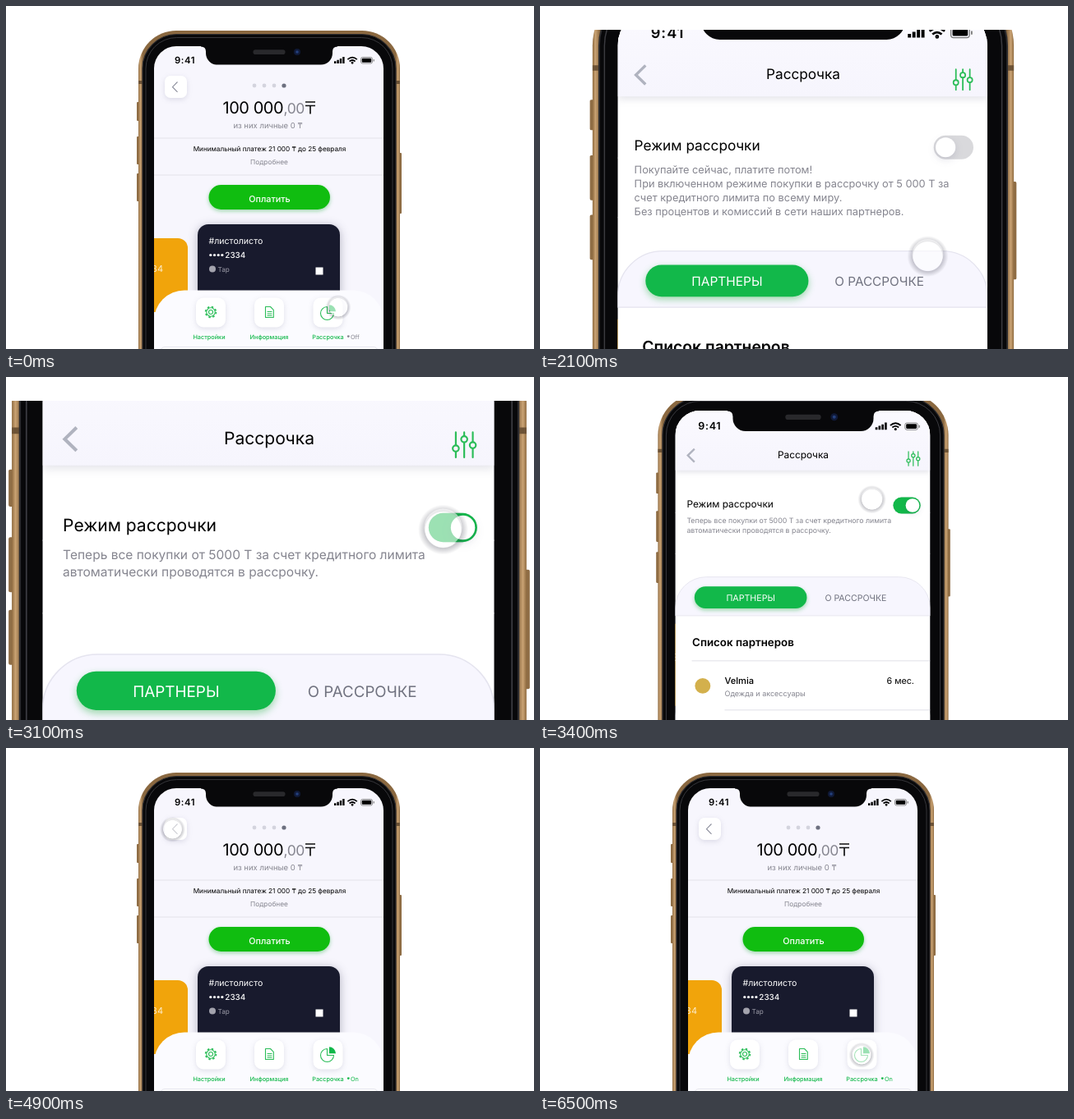
Recreate the animation shown at these times as an HTML page. Size 642 px wide and 418 px high, loop 7.2 s.

```html
<!DOCTYPE html>
<html lang="ru">
<head>
<meta charset="utf-8">
<title>Рассрочка</title>
<style>
  html, body { margin: 0; width: 100%; height: 100%; overflow: hidden; background: #fff; }
  svg { display: block; width: 642px; height: 418px; font: 10px Inter, Roboto, sans-serif; }
  text { text-rendering: geometricPrecision; white-space: pre; }
  .mid { text-anchor: middle; }
  .end { text-anchor: end; }
  .med { font-weight: 500; }
  .semi { font-weight: 600; }
  .white { fill: #fff; }
  .grey { fill: #85858f; }
  .green { fill: #12b84a; }
  .lines { fill: none; stroke: #2bbd58; stroke-width: 1.1; stroke-linejoin: round; stroke-linecap: round; }
  .rule { stroke: #e0e0e7; stroke-width: .9; }
  .lift { filter: drop-shadow(0 2px 3px rgba(60, 60, 100, .14)); }
  .glow { filter: drop-shadow(0 2px 2.5px rgba(20, 170, 50, .4)); }
  .deep { filter: drop-shadow(0 2px 6px rgba(20, 20, 50, .3)); }
</style>
</head>
<body>
<svg viewBox="0 0 642 418">
  <defs>
    <clipPath id="view"><rect x="3" y="29" width="635" height="389"/></clipPath>
    <clipPath id="glass"><rect x="180" y="49" width="279" height="460" rx="27"/></clipPath>
    <linearGradient id="gold" x1="161" x2="479" y1="0" y2="0" gradientUnits="userSpaceOnUse">
      <stop offset="0" stop-color="#8f6b40"/>
      <stop offset=".007" stop-color="#c9a273"/>
      <stop offset=".017" stop-color="#8a6840"/>
      <stop offset=".983" stop-color="#8a6840"/>
      <stop offset=".993" stop-color="#c9a273"/>
      <stop offset="1" stop-color="#8f6b40"/>
    </linearGradient>
    <linearGradient id="head" x2="0" y2="1">
      <stop offset="0" stop-color="#fbfaff"/>
      <stop offset="1" stop-color="#f6f5fd"/>
    </linearGradient>
    <radialGradient id="halo">
      <stop offset=".7" stop-color="#334" stop-opacity="0"/>
      <stop offset=".74" stop-color="#334" stop-opacity=".26"/>
      <stop offset="1" stop-color="#334" stop-opacity="0"/>
    </radialGradient>
  </defs>

  <g clip-path="url(#view)">
    <g id="camera">
      <!-- phone body -->
      <g fill="#8f6d45">
        <rect x="159" y="117" width="4" height="23" rx="1"/>
        <rect x="159" y="159" width="4" height="34" rx="1"/>
        <rect x="159" y="204" width="4" height="34" rx="1"/>
        <rect x="477" y="179" width="4" height="74" rx="1"/>
      </g>
      <rect x="161" y="30" width="318" height="520" rx="46" fill="url(#gold)"/>
      <path d="M161 93h5M474 93h5" stroke="#6d5336" stroke-width="4"/>
      <rect x="166" y="34.5" width="308" height="520" rx="41.5" fill="#08080a" stroke="#2d2c2f" stroke-width="1.2"/>
      <rect x="170" y="38.5" width="300" height="520" rx="37.5" fill="none" stroke="#3b3b40" stroke-width=".9"/>

      <g clip-path="url(#glass)">
        <!-- card screen -->
        <rect x="180" y="49" width="279" height="400" fill="#f7f6fd"/>
        <rect x="193" y="85" width="27" height="27" rx="7" class="white lift"/>
        <path d="M208.5 92.5l-6 6.2 6 6.2" fill="none" stroke="#8b8d9b" stroke-width="1.1"/>
        <g fill="#d4d4de">
          <circle cx="302" cy="97" r="2.4"/>
          <circle cx="314" cy="97" r="2.4"/>
          <circle cx="326" cy="97" r="2.4"/>
          <circle cx="338" cy="97" r="2.6" fill="#6d707f"/>
        </g>
        <text x="263.5" y="131" font-size="20" letter-spacing="-.45">100 000</text>
        <text x="337.5" y="131" font-size="17.5" letter-spacing="-.4" class="grey">,00</text>
        <path d="M364 117h12M364 121.5h12M370 121.5v10" fill="none" stroke="#111" stroke-width="1.7"/>
        <text x="318.5" y="149" font-size="9.5" class="mid grey">из них личные 0 ₸</text>
        <path d="M180 161h279M180 206h279" class="rule"/>
        <text x="320.5" y="177" font-size="8.2" class="mid">Минимальный платеж 21 000 ₸ до 25 февраля</text>
        <text x="320" y="193" font-size="8.3" class="mid grey">Подробнее</text>
        <rect x="246.5" y="218" width="147.5" height="30" rx="15" fill="#10bd10" class="glow"/>
        <text x="320.5" y="239" font-size="10.8" class="mid white med">Оплатить</text>

        <rect x="120" y="283" width="101" height="90" rx="12" fill="#f1a40b"/>
        <text x="191" y="324" font-size="11" class="end white" opacity=".8">2334</text>
        <rect x="233" y="266" width="173" height="110" rx="13" fill="#181a2d" class="deep"/>
        <text x="246.5" y="290" font-size="10.6" class="white">#листолисто</text>
        <g class="white">
          <circle cx="248.8" cy="303.5" r="1.6"/>
          <circle cx="253.5" cy="303.5" r="1.6"/>
          <circle cx="258.2" cy="303.5" r="1.6"/>
          <circle cx="262.9" cy="303.5" r="1.6"/>
        </g>
        <text x="266.3" y="307" font-size="9.9" class="white med">2334</text>
        <circle cx="251" cy="320.5" r="4" fill="#a3a3ad"/>
        <text x="257.5" y="324" font-size="8.2" fill="#9a9aa6">Tap</text>
        <rect x="376.5" y="318.5" width="9" height="9" class="white"/>

        <rect x="180" y="346.5" width="279" height="120" rx="37" fill="#fbfbff"/>
        <g class="white lift">
          <rect x="231" y="355.5" width="36" height="36" rx="9"/>
          <rect x="302" y="355.5" width="36" height="36" rx="9"/>
          <rect x="373.5" y="355.5" width="36" height="36" rx="9"/>
        </g>
        <g class="lines">
          <circle cx="249" cy="373" r="2.5"/>
          <circle cx="249" cy="373" r="5.2"/>
          <circle cx="249" cy="373" r="6.4" stroke-width="1.7" stroke-dasharray="2.4 2.63" stroke-linecap="butt"/>
          <path d="M315.5 366.5h6l3.8 3.8v9.2h-9.8zM318 372.5h5M318 375h5M318 377.3h5"/>
          <path d="M390.5 366.5a8 8 0 1 0 8 8h-8z"/>
          <path d="M393 364.3a8 8 0 0 1 8 8h-8z" class="green" stroke="none"/>
        </g>
        <g font-size="7.3" class="green med">
          <text x="247" y="405.5" class="mid">Настройки</text>
          <text x="320" y="405.5" class="mid">Информация</text>
          <text x="391.5" y="405.5" class="mid">Рассрочка</text>
          <g id="state">
            <circle cx="416.3" cy="402.6" r="1.4"/>
            <text id="word" x="419" y="405.5" font-weight="400">Off</text>
          </g>
        </g>
        <rect x="188" y="415.5" width="264" height="40" rx="5" fill="#fff" stroke="#e6e6ee"/>

        <!-- instalment screen: surfaces, then content -->
        <g id="panel">
          <rect x="180" y="49" width="279" height="400" fill="#fff"/>
          <rect x="180" y="40" width="279" height="74.5" fill="url(#head)" class="lift"/>
          <path d="M180 274v-8.5a34 34 0 0 1 34-34h211a34 34 0 0 1 34 34v8.5z" fill="#f7f6fe" stroke="#e5e4ef" stroke-width=".8"/>
        </g>
        <g id="content">
          <path d="M201 91l-7.3 7.2 7.3 7.2" fill="none" stroke="#b0b3bf" stroke-width="2.1"/>
          <text x="320" y="101.3" font-size="10.7" class="mid">Рассрочка</text>
          <g class="lines">
            <path d="M435.3 94v8M435.3 106v3.5M440.5 94v2.3M440.5 100.3v9.2M445.8 94v6M445.8 104v5.5"/>
            <circle cx="435.3" cy="104" r="1.9"/>
            <circle cx="440.5" cy="98.3" r="1.9"/>
            <circle cx="445.8" cy="102" r="1.9"/>
          </g>
          <text x="192.5" y="155.5" font-size="10.7">Режим рассрочки</text>
          <rect x="418.5" y="144" width="30" height="18" rx="9" fill="#d9d9dc"/>
          <rect id="track" x="418.5" y="144" width="30" height="18" rx="9" class="green"/>
          <circle id="knob" cx="427.5" cy="153" r="7.5" class="white lift"/>
          <g id="before" font-size="7.95" class="grey">
            <text x="192.5" y="173">Покупайте сейчас, платите потом!</text>
            <text x="192.5" y="183.4">При включенном режиме покупки в рассрочку от 5 000 Т за</text>
            <text x="192.5" y="193.8">счет кредитного лимита по всему миру.</text>
            <text x="192.5" y="204.2">Без процентов и комиссий в сети наших партнеров.</text>
          </g>
          <g id="after" font-size="7.9" class="grey">
            <text x="192.5" y="172.8">Теперь все покупки от 5000 Т за счет кредитного лимита</text>
            <text x="192.5" y="183">автоматически проводятся в рассрочку.</text>
          </g>
          <rect x="201" y="242" width="123" height="24" rx="12" class="green glow"/>
          <text x="262.5" y="257.8" font-size="9.6" class="mid white">ПАРТНЕРЫ</text>
          <text x="377.5" y="258" font-size="9.5" class="mid" fill="#70727f">О РАССРОЧКЕ</text>
          <text x="198.5" y="307.8" font-size="12" class="semi">Список партнеров</text>
          <path d="M198 323.5h261M234 377.5h225" class="rule"/>
          <circle cx="210" cy="351" r="8.5" fill="#d3b04c"/>
          <text x="234" y="349" font-size="10" class="med">Velmia</text>
          <text x="234" y="362" font-size="8.15" class="grey">Одежда и аксессуары</text>
          <text x="441.5" y="349" font-size="9.7" class="end">6 мес.</text>
          <circle cx="208" cy="405" r="8.5" fill="#4c3b39"/>
          <text x="234" y="404" font-size="10" class="med">Tofu Yard</text>
          <text x="234" y="417" font-size="8.15" class="grey">Рестораны</text>
          <text x="441.5" y="404" font-size="9.7" class="end">12 мес.</text>
        </g>
      </g>

      <!-- notch and status bar -->
      <path d="M237 48h166v1.5q-6 0-6 6v2a14 14 0 0 1-14 14H257a14 14 0 0 1-14-14v-2q0-6-6-6z" fill="#08080a"/>
      <rect x="300.5" y="53.3" width="39" height="5.7" rx="2.8" fill="#29292c"/>
      <circle cx="354" cy="56" r="4" fill="#101a38"/>
      <circle cx="354" cy="56" r="1.8" fill="#24407c"/>
      <text x="205" y="70" font-size="11.3" letter-spacing=".6" class="semi">9:41</text>
      <path d="M400.2 70v-2.8M403.6 70v-4.3M407 70v-6M410.4 70v-8" stroke="#000" stroke-width="2.4"/>
      <g fill="none" stroke="#000" stroke-width="1.7">
        <path d="M415.4 65.2q5.7-5 11.4 0M417.6 67.5q3.5-3 7 0"/>
        <circle cx="421.1" cy="69.3" r=".6"/>
      </g>
      <rect x="431.5" y="62.5" width="14" height="7.5" rx="2" fill="none" stroke="#777" stroke-width=".8"/>
      <rect x="432.7" y="63.7" width="11.6" height="5.1" rx="1"/>
      <path d="M447.2 65v2.6" stroke="#777" stroke-width="1.1"/>

      <g id="finger">
        <circle cy="1.3" r="15.5" fill="url(#halo)"/>
        <circle r="11.7" class="white" opacity=".58"/>
      </g>
    </g>
  </g>
</svg>
<script>
  const LOOP = 7200, STEP = 100, ZOOM = 0.968;
  const el = id => document.getElementById(id);
  const set = (id, name, value) => el(id).setAttribute(name, value);

  const ramp = (t, a, b) => Math.min(1, Math.max(0, (t - a) / (b - a)));
  const ease = (t, a, b) => { const p = ramp(t, a, b); return p * p * (3 - 2 * p); };

  // start time, end time, then the point reached
  const start = [404, 366];
  const moves = [
    [0, 600, 391, 373],
    [1700, 2380, 427.5, 153],
    [3150, 4200, 202.5, 98],
    [5100, 6350, 391, 373]
  ];

  function draw(t) {
    const zoom = 1 + ZOOM * (ease(t, 1700, 2380) - ease(t, 3100, 3480));
    set('camera', 'transform', `translate(320 121.5) scale(${zoom}) translate(-320 -121.5)`);

    let [x, y] = start;
    for (const [a, b, toX, toY] of moves) {
      const p = ease(t, a, b);
      x += (toX - x) * p;
      y += (toY - y) * p;
    }
    set('finger', 'transform', `translate(${x} ${y})`);

    const shown = ramp(t, 1100, 1600) - ramp(t, 4300, 4800);
    set('panel', 'opacity', shown);
    set('content', 'opacity', Math.min(1, shown * 1.4));

    const on = ease(t, 2700, 3000);
    set('track', 'opacity', on);
    set('knob', 'cx', 427.5 + 12.2 * on);
    set('before', 'opacity', 1 - on);
    set('after', 'opacity', on);
    el('word').textContent = on < 1 ? 'Off' : 'On';
    set('state', 'fill', on < 1 ? '#85858f' : '#12b84a');
  }

  const origin = performance.now();
  function tick() {
    const t = (performance.now() - origin) % LOOP;
    draw(Math.floor(t / STEP) * STEP);
    requestAnimationFrame(tick);
  }
  tick();
</script>
</body>
</html>
```
